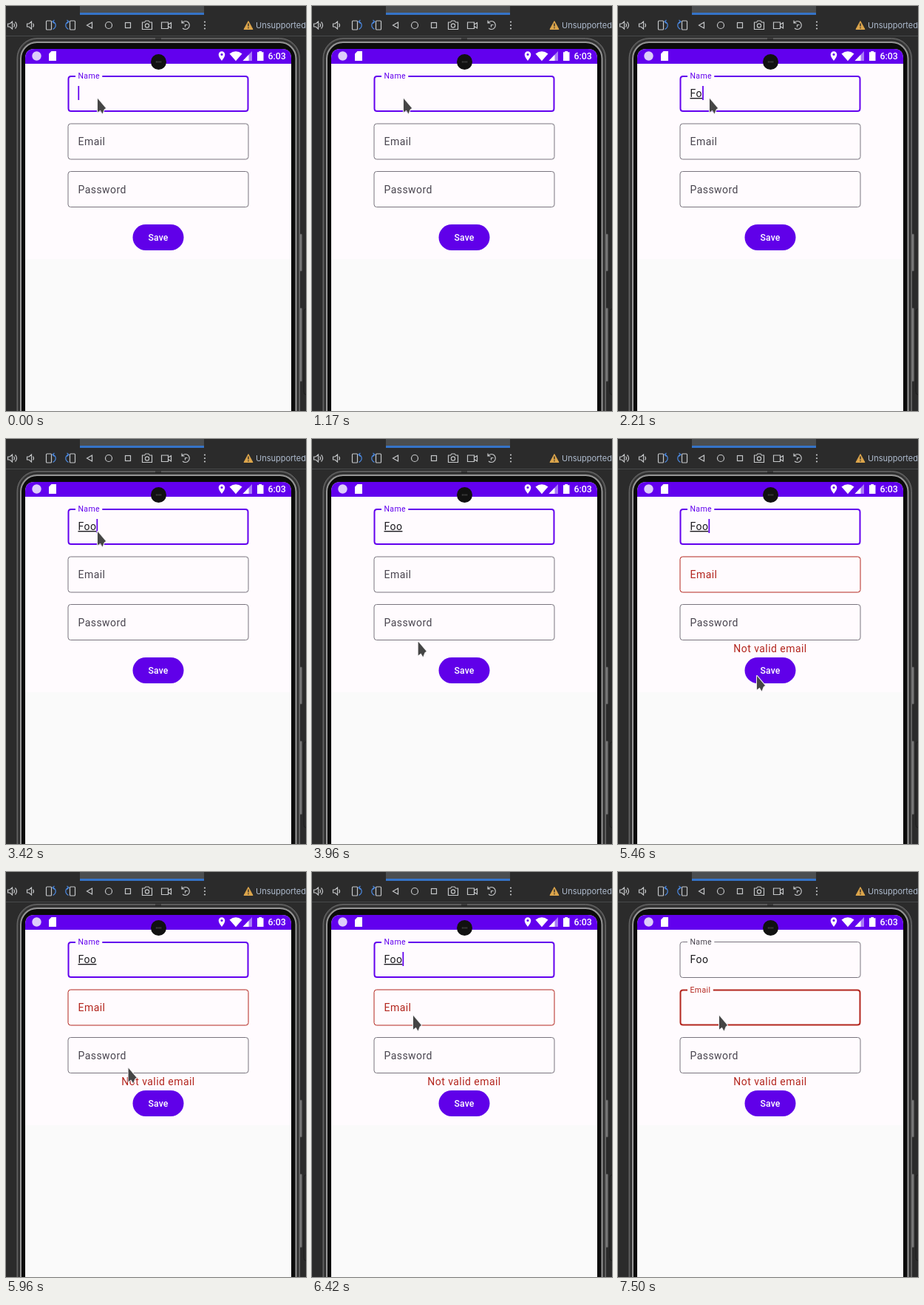
These frames come from a looping animation (406x547 px, 8 s). An HTML page:

```html
<!DOCTYPE html>
<html lang="en">
<head>
<meta charset="utf-8">
<title>Form validation</title>
<style>
  html, body { margin: 0; width: 100%; height: 100%; overflow: hidden; background: #2b2b2b; }
  svg { display: block; width: 100vw; height: 100vh; }
  text { font-family: Roboto, sans-serif; white-space: pre; }
  .body { font-size: 14px; letter-spacing: .45px; }
  .label { letter-spacing: .36px; }
  .icons { fill: none; stroke: #c4c6c8; stroke-width: 1.2; }
  .icons .solid { fill: #c4c6c8; stroke: none; }
  .icons .blue { stroke: #4a88e0; }
</style>
</head>
<body>
<svg viewBox="0 0 406 547">
  <defs>
    <clipPath id="buttonClip"><rect x="171.5" y="295" width="69" height="35" rx="17.5"/></clipPath>
  </defs>

  <!-- emulator toolbar -->
  <rect width="406" height="547" fill="#2b2b2b"/>
  <rect x="100" width="168" height="10" fill="#4b4e50"/>
  <rect x="100" y="9" width="168" height="3" fill="#3573c8"/>
  <rect y="40" width="406" height="1" fill="#484a4b"/>
  <g class="icons">
    <path d="M2.5 24H5L8.5 21V31L5 28H2.5ZM10.5 23.5Q12.5 26 10.5 28.5M12.5 21.5Q16.5 26 12.5 30.5"/>
    <path d="M28.5 24H31L34.5 21V31L31 28H28.5ZM36.5 23.5Q38.5 26 36.5 28.5"/>
    <rect x="54.5" y="20" width="7" height="12" rx="1"/>
    <path class="blue" d="M63.5 31.5Q68 29 67 24.5Q66 21.5 63 21M65.5 19L63 21L65.5 23.5"/>
    <rect x="86.5" y="20" width="7" height="12" rx="1"/>
    <path class="blue" d="M84.5 31.5Q80 29 81 24.5Q82 21.5 85 21M82.5 19L85 21L82.5 23.5"/>
    <path d="M116.5 22V30L109.5 26Z"/>
    <circle cx="139" cy="26" r="4.5"/>
    <rect x="161.5" y="22.5" width="7" height="7"/>
    <path d="M184.5 22H187.5L189 20H193L194.5 22H197.5V31.5H184.5Z"/>
    <circle cx="191" cy="26.5" r="2.6"/>
    <path d="M210.5 22H219.5V30.5H210.5ZM219.5 25L223.5 22.5V30L219.5 27.5"/>
    <path d="M238.5 22.5A5.5 5.5 0 1 1 239 30M238 19.5V23H241.5M242.5 28.5V25.5H245.5"/>
    <g class="solid"><circle cx="269" cy="21.5" r="1.1"/><circle cx="269" cy="26" r="1.1"/><circle cx="269" cy="30.5" r="1.1"/></g>
  </g>
  <path d="M328 20.5L334 31.5H322Z" fill="#dca54b" stroke="#dca54b" stroke-linejoin="round"/>
  <path d="M328 23.5V27.5M328 28.7V30.2" stroke="#2b2b2b" stroke-width="1.4"/>
  <text x="338" y="30" font-size="11" fill="#afbccf" style="font-family:Inter,sans-serif">Unsupported</text>

  <!-- phone -->
  <path d="M406 409Q403 409 403 413V521Q403 525 406 525" fill="none" stroke="#1d1d1d"/>
  <g fill="#777" stroke="#4a4a4a" stroke-width=".8">
    <rect x="396.5" y="308" width="4.2" height="50" rx="1"/>
    <rect x="396.5" y="408" width="4.2" height="99" rx="1"/>
  </g>
  <rect x="15" y="43.5" width="382.5" height="560" rx="27" fill="#4a4a4a" stroke="#6c6c6c"/>
  <rect x="17.5" y="46" width="377.5" height="560" rx="24.5" fill="#3a3a3a" stroke="#222"/>
  <rect x="20" y="49" width="372.5" height="560" rx="22" fill="#0b0b0b" stroke="#969696" stroke-width="2"/>
  <rect x="202" y="43.5" width="8" height="2.5" fill="#2a2a2a"/>
  <path d="M26 547V71Q26 58 39 58H373Q386 58 386 71V547Z" fill="#fafafa"/>
  <rect x="26" y="78" width="360" height="264" fill="#fffbfe"/>
  <path d="M26 78V71Q26 58 39 58H373Q386 58 386 71V78Z" fill="#6200ee"/>
  <circle cx="206.5" cy="75.5" r="10.5" fill="#111"/>
  <path d="M203 75.5H211" stroke="#555" stroke-width="2" stroke-dasharray="1 1"/>

  <!-- status bar -->
  <g fill="#fff">
    <circle cx="41.5" cy="67.5" r="6.2" fill="#ddcdfa"/>
    <path d="M61.5 61H68V74H58V64.5Z"/>
    <path d="M292 74Q287.7 68.5 287.7 65.5A4.3 4.3 0 0 1 296.3 65.5Q296.3 68.5 292 74Z"/>
    <circle cx="292" cy="65.5" r="1.5" fill="#6200ee"/>
    <path d="M302.5 64.5Q311 58 319.5 64.5L311 74.2Z"/>
    <path d="M333 61V74H320.5Z" fill="#a87bf5"/>
    <path d="M328.5 65.7V74H320.5Z"/>
    <path d="M342.3 61H346V62.3H348.5V74H340V62.3H342.3Z"/>
    <text x="354.5" y="72.2" font-size="12.4" font-weight="500">6:03</text>
  </g>

  <!-- form -->
  <g fill="none"><path id="nameBorder"/><path id="emailBorder"/><path id="passwordBorder"/></g>
  <text id="nameLabel" class="label" x="97.5" y="98.2" font-size="10.5">Name</text>
  <text id="nameValue" class="body" x="97.5" y="123" fill="#1c1b1f"></text>
  <text id="emailLabel" class="label" x="97.5">Email</text>
  <text class="body" x="97.5" y="252.5" fill="#49454f">Password</text>
  <text id="error" class="body" x="206" y="287.5" text-anchor="middle" fill="#b3261e">Not valid email</text>
  <rect id="caret" width="1.75" height="19"/>
  <rect x="171.5" y="295" width="69" height="35" rx="17.5" fill="#6000e9"/>
  <circle id="ripple" cx="188" cy="320" fill="#fff" clip-path="url(#buttonClip)"/>
  <text x="206" y="317" font-size="12.25" font-weight="500" letter-spacing=".09" text-anchor="middle" fill="#fff">Save</text>

  <path id="pointer" d="M0 0V18.5L3.7 15.8L6.5 20.5L8.7 14.8L11 13Z" fill="#454545" stroke="#f2eff2" stroke-width="2" paint-order="stroke" stroke-linejoin="round"/>
</svg>
<script>
const LOOP = 8000;
const PURPLE = [98, 0, 238], RED = [179, 38, 30], OUTLINE = [121, 116, 126], GREY = [73, 69, 79];
const THIN = 1, THICK = 2;

const nameCaretOn = [[0, 380], [670, 1170], [1710, 2920], [3420, 3920], [4420, 5080], [5460, 5960], [6420, 6920]];
const emailCaretOn = [[7000, 7500]];
const pointerMoves = [ // start, end, x, y
  [3490, 3710, 138.5, 268],
  [3930, 4340, 182.8, 317],
  [4380, 4500, 188, 320],
  [5770, 6400, 137, 194]
];

const el = id => document.getElementById(id);
const set = (id, attrs) => {
  for (const key in attrs) el(id).setAttribute(key, attrs[key]);
};
const mix = (a, b, p) => a + (b - a) * p;
const color = (a, b = a, p = 0) => `rgb(${a.map((v, i) => Math.round(mix(v, b[i], p)))})`;
const progress = (t, start, end) => Math.min(1, Math.max(0, (t - start) / (end - start)));
const smooth = p => p * p * (3 - 2 * p);
const easeOut = p => 1 - (1 - p) ** 1.6;
const within = (t, spans) => spans.some(([a, b]) => t >= a && t < b);

// Rounded outline with a gap in its top edge for the floating label
function outline(id, top, gap, width, stroke) {
  const l = 83.5 + width / 2, r = 328.5 - width / 2;
  const t = top + width / 2, b = top + 49 - width / 2, c = 3.5;
  const d = `M${94 + gap} ${t}H${r - c}Q${r} ${t} ${r} ${t + c}V${b - c}Q${r} ${b} ${r - c} ${b}` +
    `H${l + c}Q${l} ${b} ${l} ${b - c}V${t + c}Q${l} ${t} ${l + c} ${t}H94`;
  set(id, { d, stroke, 'stroke-width': width });
}

function pointerAt(t) {
  let x = 124, y = 125;
  for (const [start, end, toX, toY] of pointerMoves) {
    const p = easeOut(progress(t, start, end));
    x = mix(x, toX, p);
    y = mix(y, toY, p);
  }
  return `translate(${x} ${y})`;
}

function draw(t) {
  const invalid = smooth(progress(t, 5060, 5220));
  const focus = smooth(progress(t, 6940, 7120));
  const onEmail = t >= 6920;
  const typed = 'Foo'.slice(0, (t >= 1880) + (t >= 2210) + (t >= 2420));

  outline('nameBorder', 94, 36.3, mix(THICK, THIN, focus), color(PURPLE, OUTLINE, focus));
  outline('emailBorder', 158.5, 34.8 * focus, mix(THIN, THICK, focus), color(OUTLINE, RED, invalid));
  outline('passwordBorder', 223, 0, THIN, color(OUTLINE));

  set('nameLabel', { fill: color(PURPLE, GREY, focus) });
  el('nameValue').textContent = typed;
  set('nameValue', { 'text-decoration': onEmail ? 'none' : 'underline' });
  set('emailLabel', {
    y: mix(188, 162.8, focus),
    'font-size': mix(14, 10.5, focus),
    style: `letter-spacing:${mix(.45, .36, focus)}px`,
    fill: color(GREY, RED, invalid)
  });
  set('error', { opacity: t >= 5080 ? 1 : 0 });

  set('caret', {
    x: 97.4 + (onEmail ? 0 : typed.length * 8.35),
    y: onEmail ? 172.5 : 108,
    fill: color(onEmail ? RED : PURPLE),
    opacity: within(t, onEmail ? emailCaretOn : nameCaretOn) ? 1 : 0
  });
  set('ripple', {
    r: mix(12, 60, progress(t, 4830, 5200)),
    opacity: .08 * progress(t, 4810, 4920) * (1 - progress(t, 5120, 5420))
  });
  set('pointer', { transform: pointerAt(t) });
}

function tick() {
  draw(performance.now() % LOOP);
  requestAnimationFrame(tick);
}
tick();
</script>
</body>
</html>
```
